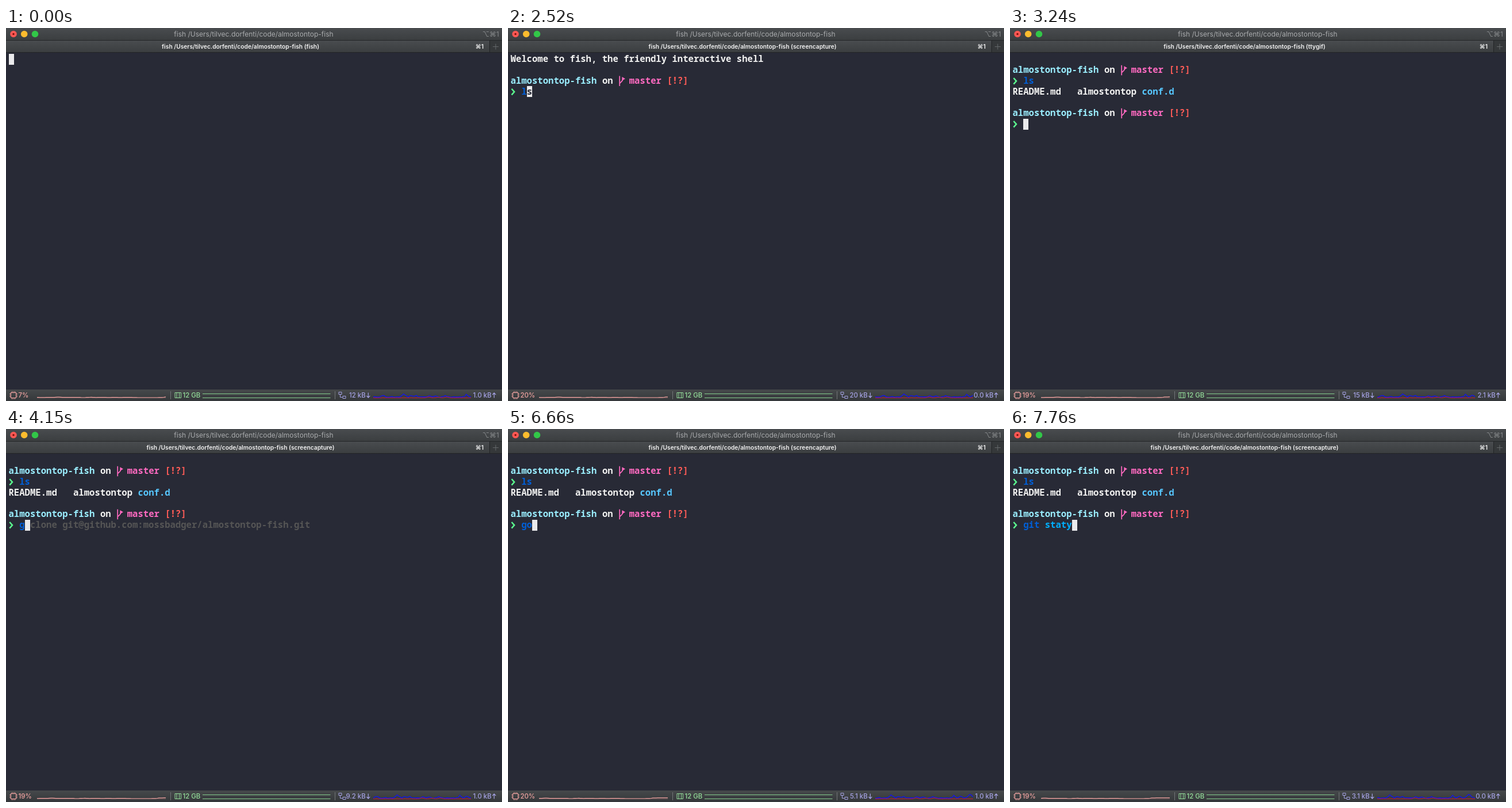
Write an HTML page that moves like this. It is 863 px wide and 649 px high and loops after 8 s.

```html
<!DOCTYPE html>
<html lang="en">
<head>
<meta charset="utf-8">
<title>Terminal session</title>
<style>
  html, body { margin: 0; width: 100%; height: 100%; overflow: hidden; background: #282a36; }
  svg { display: block; width: 100vw; height: 100vh; }
  text { white-space: pre; font-family: Inter, "DejaVu Sans", sans-serif; }
  #term text { font: 600 15.625px "Noto Sans Mono", "DejaVu Sans Mono", monospace; font-variant-ligatures: none; }
  .title { font-size: 12px; fill: #a9abad; }
  .tab { font-size: 10.25px; font-weight: 600; fill: #f4f4f4; }
  .stat { font-size: 11.4px; font-weight: 500; }
  .mid { text-anchor: middle; }
  .end { text-anchor: end; }
  .line { fill: none; stroke-width: 1.2; }
  .cpu { fill: #f0a3a1; }
  .mem { fill: #94de9a; }
  .net { fill: #a5a2e4; }
</style>
</head>
<body>
<svg viewBox="0 0 863 649">
  <defs>
    <linearGradient id="bar" x2="0" y2="1">
      <stop offset="0" stop-color="#494c4f"/><stop offset="1" stop-color="#3b3e40"/>
    </linearGradient>
    <linearGradient id="foot" x2="0" y2="1">
      <stop offset="0" stop-color="#46494b"/><stop offset="1" stop-color="#34373a"/>
    </linearGradient>
  </defs>
  <rect width="863" height="649" fill="#282a36"/>

  <rect width="863" height="21" fill="url(#bar)"/>
  <rect y="21" width="863" height="1" fill="#242628"/>
  <circle cx="13" cy="10.5" r="5.8" fill="#fc5753"/>
  <circle cx="13" cy="10.5" r="1.7" fill="#7c100c"/>
  <circle cx="31.7" cy="10.5" r="5.8" fill="#fdbc2e"/>
  <circle cx="50.5" cy="10.5" r="5.8" fill="#32c748"/>
  <text class="title mid" x="431" y="15">fish /Users/tilvec.dorfenti/code/almostontop-fish</text>
  <text class="title end" x="858" y="15" style="fill:#85888a">⌥⌘1</text>

  <rect y="22" width="841" height="20" fill="url(#bar)"/>
  <rect x="842" y="22" width="21" height="20" fill="#35383a"/>
  <path d="M841.5 22V42M0 42.5H863" stroke="#222426"/>
  <path d="M847 32.5H857M852 27.5V37.5" stroke="#65686a"/>
  <text class="tab mid" id="tab" x="408" y="35.7"></text>
  <text class="tab end" x="831" y="35.7">⌘1</text>

  <g id="term"></g>

  <rect y="629" width="863" height="20" fill="url(#foot)"/>
  <path d="M286.5 632V646M572.5 632V646" stroke="#737678"/>

  <g fill="none" stroke="#f0a3a1">
    <rect x="8.5" y="634.5" width="9" height="9"/>
    <path d="M10.5 632V634M13 632V634M15.5 632V634M10.5 644V646M13 644V646M15.5 644V646M6 636.5H8M6 639H8M6 641.5H8M18 636.5H20M18 639H20M18 641.5H20" stroke-width=".9"/>
  </g>
  <text class="stat cpu" id="cpu" x="21.5" y="643"></text>
  <path d="M54 643.5H278" stroke="#8d6566" stroke-width=".7"/>
  <path class="line" id="cpuLine" stroke="#eaa09e"/>

  <path d="M294 634.5H304.5V643.5H294ZM297 634V644M301.5 634V644" fill="none" stroke="#94de9a"/>
  <text class="stat mem" x="307.5" y="643">12 GB</text>
  <path d="M342 636.5H564.5M342 643.5H564.5" stroke="#86cf8e"/>

  <path d="M579 633.5H584V637.5H579ZM586 640.5H591V644.5H586ZM581.5 638V642.5H585.5" fill="none" stroke="#a5a2e4"/>
  <text class="stat net end" id="down" x="625.7" y="643"></text>
  <text class="stat net end" id="up" x="844.7" y="643"></text>
  <path d="M630.3 634.5V643M627.3 639.8L630.3 643L633.3 639.8M849.3 643.5V635M846.3 638.2L849.3 635L852.3 638.2" class="line" stroke="#a5a2e4"/>
  <path class="line" id="downLine" stroke="#1414ee" style="stroke-width:1.4"/>
  <path class="line" id="upLine" stroke="#cf1d36" style="stroke-width:1"/>
</svg>

<script>
const LOOP = 8000, COL = 9.375, ROW = 18.75, LEFT = 4.5, TOP = 45, SHIFT = 2.8;
const C = { white: '#f1f1f0', cyan: '#9aedfe', pink: '#ff6ac1', red: '#ff5c57', green: '#5af78e',
            sky: '#57c7ff', cmd: '#005fd7', arg: '#00afff', bad: '#ff0000', ghost: '#555555', dark: '#282a36' };
const HINTS = { l: 's', g: ' clone git@github.com:mossbadger/almostontop-fish.git' };
const KNOWN = ['l', 'ls', 'g', 'go', 'git'];
const $ = id => document.getElementById(id);

// start time, screen, typed text
const SCREENS = [
  [0, 'blank', ''], [100, 'welcome', ''], [300, 'greeted', ''],
  [2520, 'greeted', 'l'], [2610, 'greeted', 'ls'], [2700, 'blank', ''], [2800, 'top', ''],
  [3040, 'top', 'ls'], [3140, 'listing', ''], [3240, 'second', ''],
  [4150, 'second', 'g'], [4430, 'second', 'gs'], [5630, 'second', 'g'],
  [5820, 'second', 'go'], [5900, 'second', 'goi'], [5980, 'second', 'goit'], [6050, 'second', 'goit '],
  [6380, 'second', 'goit'], [6530, 'second', 'goi'], [6660, 'second', 'go'],
  [6830, 'second', 'g'], [6920, 'second', 'gi'], [7010, 'second', 'git'], [7100, 'second', 'git '],
  [7290, 'second', 'git s'], [7380, 'second', 'git st'], [7480, 'second', 'git sta'],
  [7580, 'second', 'git stat'], [7760, 'second', 'git staty']
];
const JOBS = [
  [0, 'fish'], [400, 'screencapture'], [3240, 'ttygif'], [4150, 'screencapture'],
  [5510, 'ttygif'], [5630, 'screencapture'], [6920, 'ttygif'], [7010, 'screencapture'],
  [7380, 'ttygif'], [7480, 'screencapture']
];
// start time, graph steps, cpu, download, upload
const STATS = [
  [0, 0, 7, '12', '1.0'], [300, 1, 20, '20', '0.0'], [2800, 2, 19, '15', '2.1'],
  [3240, 3, 19, '15', '2.1'], [4150, 4, 19, '9.2', '1.0'], [4430, 5, 19, '9.2', '1.0'],
  [5510, 7, 20, '5.1', '0.0'], [5820, 8, 20, '5.1', '0.0'], [6530, 9, 20, '5.1', '1.0'],
  [6830, 10, 20, '5.1', '1.0'], [7290, 11, 19, '3.1', '0.0']
];

const colX = col => LEFT + col * COL;
const rowY = row => TOP + row * ROW;
const run = (col, row, str, color) =>
  `<text x="${colX(col)}" y="${Math.round(rowY(row) + 14.4)}" fill="${color}">${str}</text>`;
const cursor = (col, row) =>
  `<rect x="${Math.round(colX(col))}" y="${Math.round(rowY(row))}" width="9" height="19" fill="#eaeaec"/>`;

function prompt(row) {
  const icon = `<g transform="translate(${colX(20)} ${rowY(row)})">
    <path d="M2.2 1V18.5M2.2 14.5C2.6 11.5 7.6 11.5 7.6 6.5" fill="none" stroke="${C.pink}" stroke-width="1.7"/>
    <path d="M6.4 2.4L12 5.8L6.4 9.2Z" fill="${C.pink}"/></g>`;
  const y = rowY(row + 1);
  const chevron = `<path d="M6.3 ${y + 4.5}L11 ${y + 9.8}L6.3 ${y + 15.1}" fill="none" stroke="${C.green}" stroke-width="2.5"/>`;
  return run(0, row, 'almostontop-fish', C.cyan) + run(17, row, 'on', C.white) + icon +
    run(22, row, 'master', C.pink) + run(29, row, '[!?]', C.red) + chevron;
}

function input(row, typed) {
  const [cmd] = typed.split(' ');
  const end = 2 + typed.length, hint = HINTS[typed] || '';
  return run(2, row, cmd, KNOWN.includes(cmd) ? C.cmd : C.bad) +
    run(3 + cmd.length, row, typed.slice(cmd.length + 1), C.arg) +
    cursor(end, row) + run(end, row, hint.slice(0, 1).trim(), C.dark) +
    run(end + 1, row, hint.slice(1), C.ghost);
}

const listing = () => prompt(1) + run(2, 2, 'ls', C.cmd) + run(0, 3, 'README.md', C.white) +
  run(12, 3, 'almostontop', C.white) + run(24, 3, 'conf.d', C.sky);
const welcome = () => run(0, 0, 'Welcome to fish, the friendly interactive shell', C.white);

const VIEWS = {
  blank: () => cursor(0, 0),
  welcome: () => welcome() + cursor(0, 1),
  greeted: typed => welcome() + prompt(2) + input(3, typed),
  top: typed => prompt(1) + input(2, typed),
  listing: () => listing() + cursor(0, 4),
  second: typed => listing() + prompt(5) + input(6, typed)
};

const noise = n => { const v = Math.sin(n * 91.7) * 4375.5; return v - Math.floor(v); };
const hills = (x, list) => list.reduce((sum, [at, h, w]) => sum + h * Math.exp(-(((x - at) / w) ** 2)), 0);
const DOWN = [[656, 3, 3], [692, 5, 4], [705, 2.6, 3], [713, 2.8, 2.5], [736, 1.8, 3], [747, 2, 3],
              [765, 2, 3], [801, 4.4, 2.5], [813, 3.4, 3], [829, 6, 4.5]];
const UP = [[735, 1.6, 4], [752, 1.2, 4], [767, 1.7, 4]];

function plot(from, to, step, height) {
  const points = [], shift = step * SHIFT, first = Math.ceil((from + shift) / SHIFT);
  const add = x => points.push(`${(x - shift).toFixed(1)} ${height(x).toFixed(1)}`);
  add(from + shift);
  for (let i = first; i * SHIFT < to + shift; i++) add(i * SHIFT);
  add(to + shift);
  return 'M' + points.join('L');
}

const cpuY = x => 643 - .4 * noise(Math.round(x / 9)) -
  (x > 273 ? Math.min(1.2, (x - 273) / 4) : 0) - hills(x, [[90, .4, 8], [150, .3, 6]]);
const downY = x => 642.6 - 1.3 * noise(Math.round(x / SHIFT)) - hills(x, DOWN);
const upY = x => 643.7 - .3 * noise(Math.round(x / SHIFT) + 50) - hills(x, UP);

const at = (list, t) => list.findLast(entry => entry[0] <= t);
const shown = {};
function update(key, entry, draw) {
  if (shown[key] !== entry) { shown[key] = entry; draw(entry); }
}

function frame(now) {
  const t = now % LOOP;
  update('screen', at(SCREENS, t), ([, view, typed]) => { $('term').innerHTML = VIEWS[view](typed); });
  update('job', at(JOBS, t), ([, job]) => {
    $('tab').textContent = `fish /Users/tilvec.dorfenti/code/almostontop-fish (${job})`;
  });
  update('stats', at(STATS, t), ([, step, cpu, down, up]) => {
    $('cpu').textContent = cpu + '%';
    $('down').textContent = down + ' kB';
    $('up').textContent = up + ' kB';
    $('cpuLine').setAttribute('d', plot(54, 278, step, cpuY));
    $('downLine').setAttribute('d', plot(639, 809, step, downY));
    $('upLine').setAttribute('d', plot(639, 809, step, upY));
  });
}

const start = performance.now();
function loop() {
  frame(performance.now() - start);
  requestAnimationFrame(loop);
}
loop();
</script>
</body>
</html>
```
